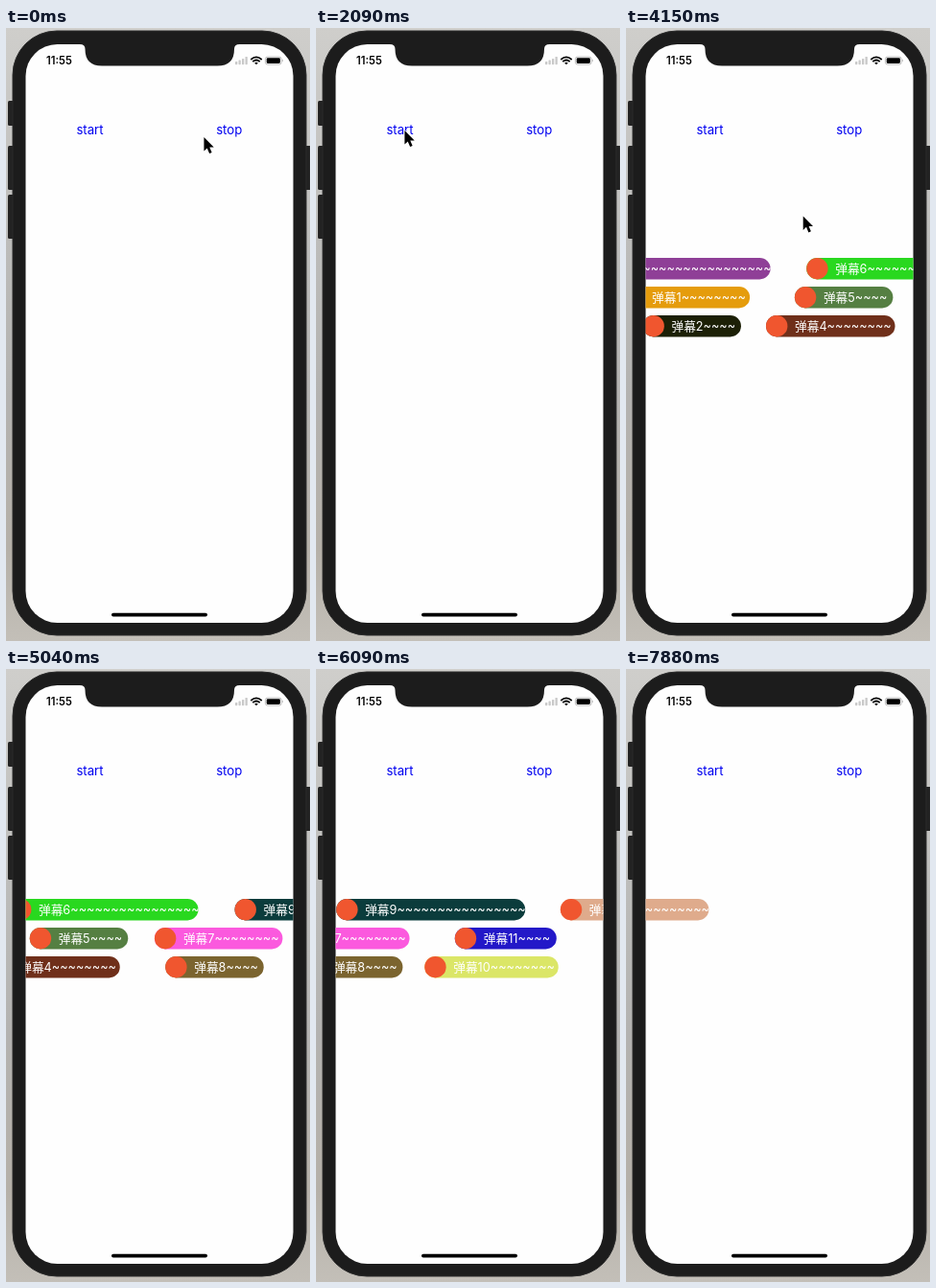
An HTML page that plays this animation: 317x640 px, repeating every 8000 ms.

```html
<!DOCTYPE html>
<html lang="en">
<head>
<meta charset="utf-8">
<title>Bullet comments</title>
<style>
html, body { margin: 0; width: 100%; height: 100%; overflow: hidden; background: #c3c2bf; }
svg { display: block; width: 317px; height: 640px; }
text { font-family: Inter, "Noto Sans CJK SC", "Noto Sans CJK", sans-serif; }
.link { font-size: 13.2px; fill: #0000f0; text-anchor: middle; }
.bullet text { font-size: 12.7px; fill: #fff; }
</style>
</head>
<body>
<svg viewBox="0 0 317 640" xmlns="http://www.w3.org/2000/svg">
  <defs>
    <linearGradient id="wall" x2="0" y2="1">
      <stop offset="0" stop-color="#cfcecb"/>
      <stop offset=".35" stop-color="#bcbcba"/>
      <stop offset=".6" stop-color="#b3b2b0"/>
      <stop offset=".85" stop-color="#b5b0a8"/>
      <stop offset="1" stop-color="#c3bfb8"/>
    </linearGradient>
    <clipPath id="screen"><rect x="20.5" y="17" width="279" height="604" rx="33"/></clipPath>
  </defs>
  <rect width="317" height="640" fill="url(#wall)"/>
  <g fill="#222">
    <rect x="2" y="76" width="8" height="26" rx="1.5"/>
    <rect x="2" y="123" width="8" height="46" rx="1.5"/>
    <rect x="2" y="174" width="8" height="46" rx="1.5"/>
    <rect x="310" y="123" width="8" height="46" rx="1.5"/>
  </g>
  <rect x="7" y="3" width="306" height="631" rx="46" fill="#1c1c1c" stroke="#2b2b2b"/>
  <rect x="20.5" y="17" width="279" height="604" rx="33" fill="#fefefe"/>
  <path d="M77 16.5V17Q82.5 17 82.5 22Q82.5 39.5 100 39.5H220.500Q238 39.5 238 22Q238 17 243.500 17V16.5Z" fill="#1c1c1c"/>

  <text x="42" y="38" font-size="11.2" font-weight="600">11:55</text>
  <g fill="#c9c9c9">
    <rect x="239" y="35" width="2.3" height="3.2" rx=".6"/>
    <rect x="242.500" y="33.500" width="2.3" height="4.700" rx=".6"/>
    <rect x="246" y="32" width="2.3" height="6.2" rx=".6"/>
    <rect x="249.500" y="30" width="2.3" height="8.2" rx=".6"/>
  </g>
  <g fill="none" stroke="#000" stroke-width="1.7">
    <path d="M255.300 33Q261 27.800 266.700 33M257.300 35.200Q261 31.800 264.700 35.200"/>
    <path d="M261 38.300L259.200 36.500Q261 35 262.800 36.500Z" fill="#000" stroke="none"/>
  </g>
  <rect x="270.400" y="30.100" width="16.800" height="8" rx="2.4" fill="none" stroke="#aaa" stroke-width=".8"/>
  <rect x="271.700" y="31.300" width="14.200" height="5.600" rx="1.3"/>
  <path d="M288 32.600Q289.500 34.100 288 35.600Z" fill="#999"/>

  <text class="link" x="87.500" y="111">start</text>
  <text class="link" x="232.700" y="111">stop</text>
  <g id="lanes" clip-path="url(#screen)"></g>
  <rect x="110" y="610.700" width="100" height="3.800" rx="1.900"/>
  <path id="cursor" d="M0 0V14.500L3.300 11.400L5.700 17L8.200 15.900L5.900 10.500H10.300Z"
        stroke="#fff" stroke-width="1.2" paint-order="stroke"/>
</svg>
<script>
const LOOP = 8000, RIGHT = 300;
const TOP = [240, 270, 300];

// number, tildes, row, color, width, entry time, speed in px/ms
const bullets = [
  [1, 8, 1, '#e59c0c', 132, 2485, .1818],
  [2, 4, 2, '#1c2006', 102.5, 2487, .1698],
  [3, 16, 0, '#8f3f97', 196.5, 2480, .207],
  [4, 8, 2, '#6f2f1a', 134.5, 3304, .1818],
  [5, 4, 1, '#557f42', 102.5, 3420, .1698],
  [6, 16, 0, '#29d81f', 196.5, 3611, .207],
  [7, 8, 1, '#fb59de', 133.5, 4243, .1818],
  [8, 4, 2, '#7b642f', 102.5, 4253, .1698],
  [9, 16, 0, '#0b3c3c', 197, 4744, .207],
  [10, 8, 2, '#dbe667', 139.5, 5076, .184],
  [11, 4, 1, '#2318c8', 106, 5186, .1715],
  [12, 16, 0, '#dfab8c', 202, 5873, .207]
];

// time, x, y of the pointer tip
const path = [
  [0, 206.5, 114], [150, 196, 113], [450, 135, 106], [750, 92, 108],
  [900, 92, 108], [1050, 118, 103], [1200, 200, 100], [1350, 267, 105],
  [1490, 233, 108], [1640, 233, 108], [1940, 118, 107], [2090, 92.5, 107],
  [2240, 80, 108], [2390, 80, 108], [2540, 79, 110], [2990, 92, 128],
  [3420, 124, 150], [3710, 147, 170], [4150, 184.500, 196.500],
  [4450, 245, 168], [4740, 301, 126], [4890, 330, 108]
];

const lanes = document.getElementById('lanes');
const cursor = document.getElementById('cursor');

function add(parent, tag, attrs, text = '') {
  const el = document.createElementNS('http://www.w3.org/2000/svg', tag);
  for (const key in attrs) el.setAttribute(key, attrs[key]);
  el.textContent = text;
  return parent.appendChild(el);
}

function place(el, x, y) {
  el.setAttribute('transform', `translate(${x.toFixed(2)} ${y.toFixed(2)})`);
}

const items = bullets.map(([n, tildes, row, fill, width, start, speed]) => {
  const el = add(lanes, 'g', { class: 'bullet' });
  add(el, 'rect', { width, height: 22.4, rx: 11.2, fill });
  add(el, 'circle', { cx: 11.2, cy: 11.2, r: 11.2, fill: '#f0562f' });
  add(el, 'text', { x: 30, y: 16 }, '弹幕' + n + '~'.repeat(tildes));
  return { el, width, start, speed, y: TOP[row] };
});

function pointer(t) {
  const i = path.findIndex(p => p[0] > t);
  if (i < 0) return path[path.length - 1].slice(1);
  const a = path[i - 1], b = path[i];
  const k = (t - a[0]) / (b[0] - a[0]);
  return [a[1] + (b[1] - a[1]) * k, a[2] + (b[2] - a[2]) * k];
}

function draw(t) {
  for (const b of items) {
    const x = RIGHT - (t - b.start) * b.speed;
    const shown = x < RIGHT && x + b.width > 20;
    b.el.setAttribute('visibility', shown ? 'visible' : 'hidden');
    place(b.el, x, b.y);
  }
  place(cursor, ...pointer(t));
}

const begin = performance.now();
function tick() {
  draw((performance.now() - begin) % LOOP);
  requestAnimationFrame(tick);
}
tick();
</script>
</body>
</html>
```
